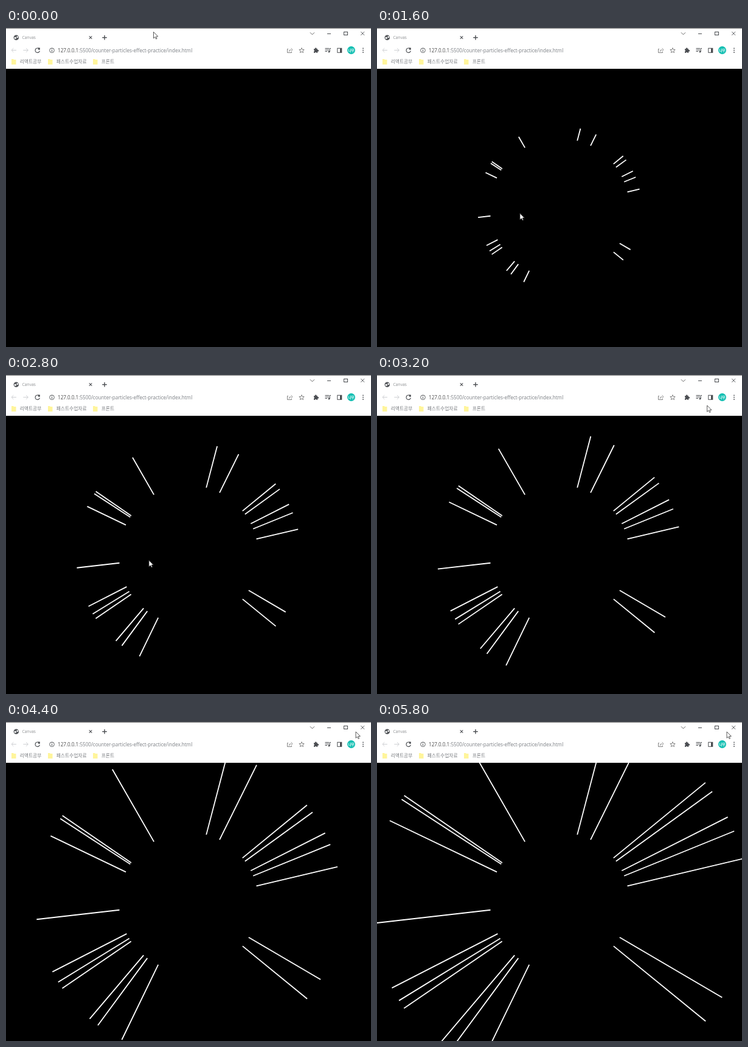
These frames come from a looping animation (600 by 524 pixels, 5900 ms). An HTML page with a canvas:

```html
<!DOCTYPE html>
<html lang="ko">
<head>
<meta charset="utf-8">
<title>Canvas</title>
<style>
html, body { margin: 0; width: 100%; height: 100%; overflow: hidden; background: #000; }
canvas { display: block; }
</style>
</head>
<body>
<canvas id="stage" width="600" height="524"></canvas>
<script>
const ctx = document.getElementById('stage').getContext('2d');
const LOOP = 5900, STEP = 100, TAU = Math.PI * 2;
const HEADER = 67;
const CENTER = { x: 300.2, y: 295.8 };
const INNER = 114.4, SPEED = 0.0416, START = 1105;
// heading of each ray in degrees
const HEADINGS = [
  -75.3, -63.6, -39.3, -35.9, -26.8, -22.1, -13.3, 30.4, 39.2, 115.9,
  126.4, 130.3, 145.7, 148.5, 152.9, 173.5, 205.6, 213, 214.4, 240.1
];
const TAB = { x: 242.5, y: 6.5 }, PAGE = { x: 235, y: 304.5 };
const CORNER = { x: 576.5, y: 22 }, REST = { x: 575, y: 16 };
const SANS = '"Open Sans", "Noto Sans", sans-serif';
const KOREAN = '"Noto Sans CJK KR", "Noto Sans CJK", sans-serif';
const INK = '#4a4d51', SOFT = '#777', PALE = '#cfd1d4';

const clamp = v => Math.min(1, Math.max(0, v));
const mix = (a, b, p) => a + (b - a) * p;
const polar = (c, r, a) => [c.x + r * Math.cos(a), c.y + r * Math.sin(a)];

function path(points, close) {
  ctx.beginPath();
  for (const p of points) ctx.lineTo(...p);
  if (close) ctx.closePath();
}

function line(points, color = INK, width = 1, close = false) {
  path(points, close);
  ctx.strokeStyle = color;
  ctx.lineWidth = width;
  ctx.stroke();
}

function arc(x, y, r, color = INK, width = 1, from = 0, to = TAU) {
  ctx.beginPath();
  ctx.arc(x, y, r, from, to);
  ctx.strokeStyle = color;
  ctx.lineWidth = width;
  ctx.stroke();
}

function dot(x, y, r, color = INK) {
  ctx.beginPath();
  ctx.arc(x, y, r, 0, TAU);
  ctx.fillStyle = color;
  ctx.fill();
}

function box(x, y, w, h, color = INK) {
  ctx.fillStyle = color;
  ctx.fillRect(x, y, w, h);
}

function text(str, x, y, font, color) {
  ctx.font = font;
  ctx.fillStyle = color;
  ctx.fillText(str, x, y);
  return x + ctx.measureText(str).width;
}

// two crossing strokes, turned by the given angle
function cross(x, y, r, width, turn) {
  for (const a of [turn, turn + Math.PI / 2]) {
    line([polar({ x, y }, r, a), polar({ x, y }, -r, a)], INK, width);
  }
}

function chevron(x, y, r, angle, color, width = 1) {
  const tip = { x, y };
  line([polar(tip, r, angle + 2.36), [x, y], polar(tip, r, angle - 2.36)], color, width);
}

function star(x, y, r) {
  const points = Array.from({ length: 10 }, (_, i) =>
    polar({ x, y }, i % 2 ? r * 0.44 : r, (i / 10 - 0.25) * TAU));
  line(points, SOFT, 0.9, true);
}

function drawTabBar() {
  dot(16.8, 15.8, 4.3, '#55585c');
  dot(15.2, 16.3, 1.6, '#fff');
  dot(18.8, 14.8, 1.4, '#fff');
  text('Canvas', 26.5, 18.2, '300 7px ' + SANS, '#55585c');
  cross(139, 15.6, 3.2, 1.1, TAU / 8);
  cross(162, 15.7, 3.8, 1.4, 0);

  chevron(503.5, 10.9, 5, TAU / 4, '#666');
  line([[528, 9.5], [534, 9.5]]);
  ctx.strokeRect(555.5, 6.5, 6, 5);
  cross(586.2, 9, 4.1, 0.9, TAU / 8);
}

function drawToolbar() {
  for (const [x, dir] of [[13, -1], [32.3, 1]]) {
    line([[x - 4, 36.5], [x + 4, 36.5]], PALE);
    chevron(x + 4 * dir, 36.5, 4.7, dir < 0 ? Math.PI : 0, PALE);
  }
  arc(51.8, 36.7, 3.7, INK, 1.2, 0.25, 5.4);
  box(53, 32.5, 2.8, 3.2);

  arc(75.5, 36.7, 3.8, INK, 0.9);
  box(75, 36, 1, 3);
  box(75, 34, 1, 1);
  const url = '8.1px ' + SANS;
  const end = text('127.0.0.1', 85, 39.6, url, '#4a4a4a');
  text(':5500/counter-particles-effect-practice/index.html', end, 39.6, url, '#7b7f84');

  line([[464, 34.5], [462.5, 34.5], [462.5, 40.5], [469.5, 40.5], [469.5, 39]], SOFT, 0.9);
  arc(468.5, 39, 3.3, SOFT, 0.9, Math.PI, TAU * 0.75);
  chevron(471, 35.7, 3.4, 0, SOFT, 0.9);
  star(486, 37, 4.4);

  box(506, 34.3, 6.2, 6.5);
  dot(509.2, 33.8, 1.4);
  dot(512.7, 37.3, 1.4);
  dot(506, 37.5, 1.1, '#fff');
  dot(509.2, 40.8, 1.1, '#fff');

  for (let i = 0; i < 3; i++) box(524.5, 33 + i * 2.5, i < 2 ? 6.5 : 3.5, 1);
  line([[534, 33.5], [532.2, 33.5], [532.2, 39]]);
  dot(531, 39, 1.4);

  ctx.strokeRect(544.8, 33.3, 7, 7);
  box(549, 33.3, 3, 7);

  dot(567.5, 36.5, 6.5, '#13bfb2');
  ctx.textAlign = 'center';
  text('나무', 567.5, 38.5, 'bold 5.5px ' + KOREAN, '#fff');
  ctx.textAlign = 'left';
  for (let i = -1; i < 2; i++) dot(587, 36.7 + i * 3.3, 0.9);
}

function drawBookmarks() {
  for (const [label, x] of [['리액트공부', 9], ['패스트수업자료', 69], ['프론트', 143]]) {
    box(x, 52, 7.5, 8, '#fff59b');
    box(x, 51, 3.5, 1, '#fff59b');
    text(label, x + 13.7, 58.3, '300 7.75px ' + KOREAN, '#7a7d81');
  }
}

function drawBrowser() {
  box(0, 0, 600, HEADER, '#fff');
  box(0, 0, 600, 1, '#757575');
  drawTabBar();
  drawToolbar();
  drawBookmarks();
}

function drawRays(t) {
  const outer = INNER + Math.max(0, t - START) * SPEED;
  for (const deg of HEADINGS) {
    const a = deg / 360 * TAU;
    line([polar(CENTER, INNER, a), polar(CENTER, outer, a)], '#fff', 1.8);
  }
}

function pointerAt(t) {
  if (t < 1200) {
    // swings out to the left on its way down
    const p = clamp((t - 600) / 600);
    return {
      x: mix(TAB.x, PAGE.x, p) - 4 * 132 * p * (1 - p),
      y: mix(TAB.y, PAGE.y, p)
    };
  }
  if (t > 3600) return REST;
  const p = 1 - (1 - clamp((t - 3000) / 600)) ** 5.7;
  return { x: mix(PAGE.x, CORNER.x, p), y: mix(PAGE.y, CORNER.y, p) };
}

function drawPointer({ x, y }) {
  ctx.save();
  ctx.translate(x, y);
  path([[0, 0], [0, 10.4], [2.4, 8.2], [4.1, 11.6], [5.6, 10.9], [4.1, 7.6], [7.3, 7.4]], true);
  ctx.fillStyle = '#fff';
  ctx.fill();
  ctx.strokeStyle = '#333';
  ctx.lineWidth = 0.8;
  ctx.stroke();
  ctx.restore();
}

function draw(elapsed) {
  const t = Math.floor((elapsed % LOOP) / STEP) * STEP;
  box(0, 0, 600, 524, '#000');
  drawRays(t);
  drawBrowser();
  drawPointer(pointerAt(t));
}

const origin = performance.now();
function frame() {
  draw(performance.now() - origin);
  requestAnimationFrame(frame);
}
frame();
</script>
</body>
</html>
```
